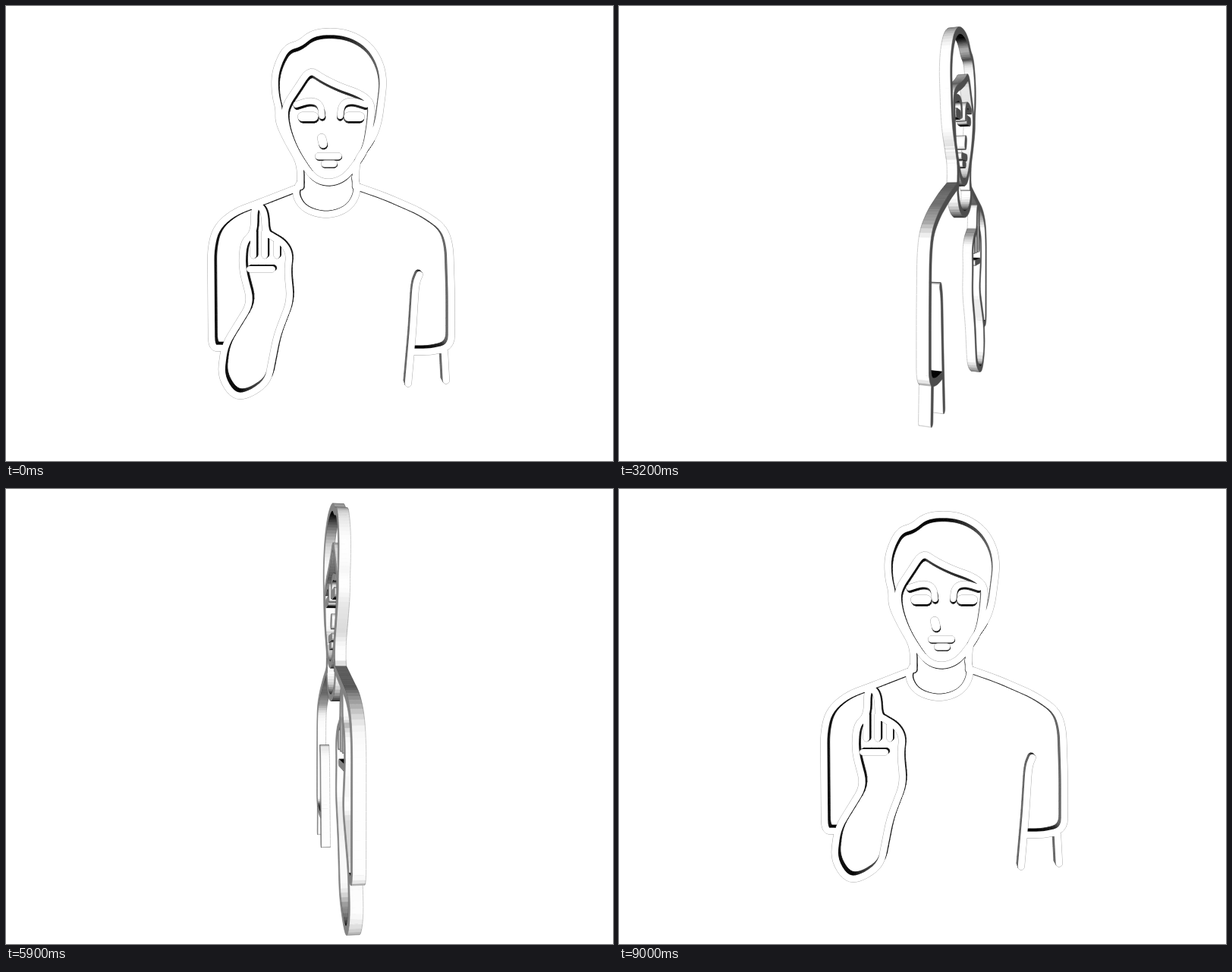
Write an HTML page with a canvas that moves like this. It is 800x600 px and loops after 9100 ms.

```html
<!DOCTYPE html>
<html lang="en">
<head>
<meta charset="utf-8">
<title>Turning figure</title>
<style>
html, body { margin: 0; height: 100%; overflow: hidden; background: #fff; }
canvas { display: block; }
</style>
</head>
<body>
<canvas id="stage" width="800" height="600"></canvas>
<script>
const ctx = document.getElementById('stage').getContext('2d');
const CX = 400, CY = 263;      // point the camera looks at
const DIST = 665, AXIS = 39;   // camera distance, sideways offset of the turning axis
const DEPTH = 13.5;            // the figure reaches back from its front plane by this much
const TILT = 0.06;             // angle at the start of the loop
const STEP = 100, STEPS = 91;
const MIDDLE = 428.5;          // the eyes mirror each other around this line

const mix = (a, b, t) => [a[0] + (b[0] - a[0]) * t, a[1] + (b[1] - a[1]) * t];
const gap = (a, b) => Math.hypot(b[0] - a[0], b[1] - a[1]);

// Rounds the corners of a line and splits it into short pieces
function smooth(pts, closed) {
  const out = [], n = pts.length;
  const toward = (a, b) => mix(a, b, Math.min(0.5, 15 / gap(a, b)));
  const straight = (a, b) => {
    const parts = Math.ceil(gap(a, b) / 10);
    for (let k = 0; k < parts; k++) out.push(mix(a, b, k / parts));
  };
  pts.forEach((p, i) => {
    const next = pts[(i + 1) % n], prev = pts[(i + n - 1) % n];
    const first = !closed && i === 0, last = !closed && i === n - 1;
    const a = first ? p : toward(p, prev), b = first || last ? p : toward(p, next);
    if (last) return out.push(p);
    if (!first) for (let t = 0; t < 1; t += 0.2) out.push(mix(mix(a, p, t), mix(p, b, t), t));
    straight(b, !closed && i === n - 2 ? next : toward(next, p));
  });
  return out;
}

// From the stage at the start angle to the flat drawing
function flatten([x, y]) {
  const c = Math.cos(TILT), s = Math.sin(TILT), X = x - CX;
  const u = DIST * (X - AXIS) / (DIST * c + X * s);
  return [u, (y - CY) * (DIST - u * s) / DIST];
}

// Outlines of a pen stroke; the outside is always on the left of the direction of travel
const loops = [];
function pen(points, half = 4.3, closed = false) {
  const line = smooth(points, closed), n = line.length;
  const left = [], right = [];
  line.forEach((p, i) => {
    const a = line[closed ? (i + n - 1) % n : Math.max(0, i - 1)];
    const b = line[closed ? (i + 1) % n : Math.min(n - 1, i + 1)];
    const len = gap(a, b), dx = half * (b[0] - a[0]) / len, dy = half * (b[1] - a[1]) / len;
    left.push([p[0] + dy, p[1] - dx]);
    right.unshift([p[0] - dy, p[1] + dx]);
  });
  const cap = (center, from) => {
    const start = Math.atan2(from[1] - center[1], from[0] - center[0]);
    return [1, 2, 3, 4, 5].map(k => start + k * Math.PI / 6)
      .map(a => [center[0] + half * Math.cos(a), center[1] + half * Math.sin(a)]);
  };
  const outlines = closed ? [left, right]
    : [[...left, ...cap(line[n - 1], left[n - 1]), ...right, ...cap(line[0], right[n - 1])]];
  loops.push(...outlines.map(o => o.map(flatten)));
}
const ring = points => pen(points, undefined, true);

// Head, face with fringe, collar
pen([[388, 238], [388, 207], [373, 182], [359, 153], [360, 136], [355, 118], [354, 92], [361, 70], [371, 54],
  [387, 50], [402, 37], [424, 33], [452, 36], [477, 50], [492, 72], [498, 98], [494, 130], [491, 152],
  [484, 173], [470, 193], [461, 208], [461, 238]]);
ring([[400, 83], [417, 95], [442, 107], [466, 115], [482, 127], [481, 150], [475, 187], [461, 209], [445, 228],
  [424, 234], [405, 227], [387, 201], [376, 180], [368, 155], [367, 133], [384, 108]]);
pen([[388, 232], [380, 247], [392, 268], [422, 277], [451, 268], [464, 246], [460, 226]]);

// Shoulders, sleeves, hanging arm
pen([[463, 238], [500, 251], [548, 272], [577, 292], [585, 316], [587, 380], [587, 449], [562, 456], [538, 456]]);
pen([[545, 354], [540, 366], [536, 430], [530, 498]]);
pen([[578, 456], [580, 494]]);
pen([[381, 241], [340, 257], [300, 272], [277, 292], [270, 320], [271, 451], [284, 451]]);

// Raised arm with hand, gaps between the fingers, palm line
ring([[327, 266], [327, 299], [313, 311], [311, 345], [323, 391], [288, 448], [283, 488], [299, 514], [318, 514],
  [345, 496], [357, 435], [375, 388], [371, 348], [374, 328], [366, 313], [351, 304], [342, 299], [341, 274], [335, 263]]);
for (const [x, top] of [[326, 298], [341, 298], [357, 308]]) pen([[x, top], [x, 329]], 4);
pen([[321, 347], [351, 347]], 4);

// Eyes, nose, lips
for (const side of [-1, 1]) {
  const at = (dx, y) => [MIDDLE + side * dx, y];
  pen([at(46, 130), at(27, 124), at(14, 129), at(12, 145)], 4);
  pen([at(38, 146), at(23, 146)], 6);
}
pen([[416, 174], [418, 182]], 5.5);
pen([[412, 198], [438, 198]], 4.5);
pen([[420, 208], [432, 208]], 4.5);

// Light comes from the camera, with a weaker one from the left
function shade(nx, nz) {
  const v = Math.round(255 * Math.min(1, Math.max(0, nz) + 0.42 * Math.max(0, -nx)));
  return `rgb(${v},${v},${v})`;
}

function draw(angle) {
  const c = Math.cos(angle), s = Math.sin(angle);
  const project = ([u, v], w) => {
    const k = DIST / (DIST - u * s - w * c);
    return [CX + (AXIS + u * c - w * s) * k, CY + v * k];
  };
  const trace = pts => pts.forEach((p, i) => i ? ctx.lineTo(...p) : ctx.moveTo(...p));

  const height = AXIS * s + DIST * c;   // camera in front of the front plane
  const front = height > -DEPTH / 2;
  const nearW = front ? 0 : -DEPTH, farW = -DEPTH - nearW;
  const faces = loops.map(pts => pts.map(p => project(p, nearW)));
  const walls = [];
  loops.forEach((pts, n) => {
    const near = faces[n], far = pts.map(p => project(p, farW));
    pts.forEach((p, i) => {
      const j = (i + 1) % pts.length, q = pts[j], len = gap(p, q);
      if (len < 0.01) return;
      const nu = (q[1] - p[1]) / len, nv = (p[0] - q[0]) / len;
      const nx = nu * c, nz = nu * s;
      const [u, v] = mix(p, q, 0.5);
      const x = AXIS + u * c + DEPTH / 2 * s, z = u * s - DEPTH / 2 * c;
      if (nz * (DIST - z) - nx * x - nv * v <= 0) return;
      walls.push({
        depth: Math.hypot(x, v, DIST - z),
        color: shade(nx, nz),
        quad: [far[i], far[j], near[j], near[i]]
      });
    });
  });
  walls.sort((a, b) => b.depth - a.depth);

  ctx.fillStyle = '#fff';
  ctx.fillRect(0, 0, 800, 600);
  ctx.lineJoin = 'round';
  for (const { quad, color } of walls) {
    ctx.beginPath();
    trace(quad);
    ctx.closePath();
    ctx.fillStyle = ctx.strokeStyle = color;
    ctx.lineWidth = 0.7;
    ctx.fill();
    ctx.stroke();
    ctx.beginPath();
    trace(quad.slice(0, 2));
    ctx.strokeStyle = 'rgba(60,60,60,.5)';
    ctx.lineWidth = 0.5;
    ctx.stroke();
  }

  // No wall can stand in front of the visible face
  if (height < 0 && height > -DEPTH) return;
  ctx.beginPath();
  for (const face of faces) {
    trace(face);
    ctx.closePath();
  }
  ctx.strokeStyle = 'rgba(60,60,60,.5)';
  ctx.lineWidth = 0.9;
  ctx.stroke();
  ctx.fillStyle = front ? shade(-s, c) : shade(s, -c);
  ctx.fill();
}

const start = performance.now();
let shown = -1;
function tick() {
  const step = Math.floor((performance.now() - start) / STEP) % STEPS;
  if (step !== shown) {
    shown = step;
    const t = step / (STEPS - 1);
    draw(TILT + 2 * Math.PI * t * t * (3 - 2 * t));
  }
  requestAnimationFrame(tick);
}
tick();
</script>
</body>
</html>
```
